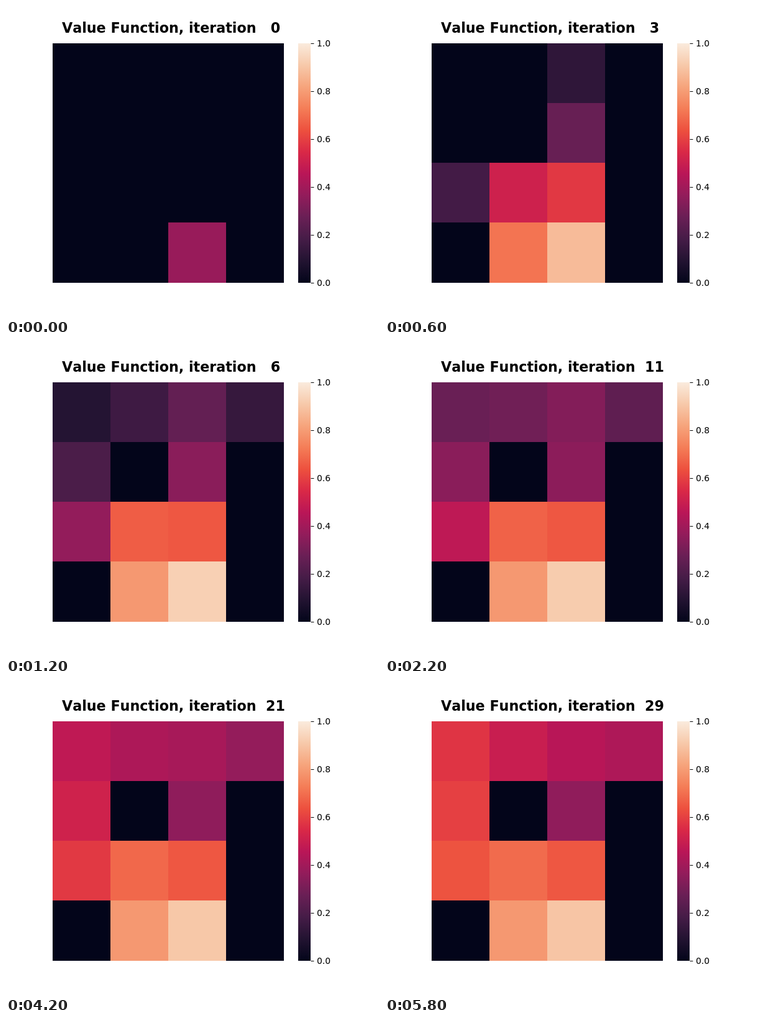
An HTML page with a canvas that plays this animation: 600 px wide and 500 px high, repeating every 6 s.

```html
<!DOCTYPE html>
<html lang="en">
<head>
<meta charset="utf-8">
<title>Value Function</title>
<style>
  html, body { margin: 0; width: 100%; height: 100%; overflow: hidden; background: #fff; }
  canvas { display: block; }
</style>
</head>
<body>
<canvas id="stage" width="600" height="500"></canvas>
<script>
const ctx = document.getElementById('stage').getContext('2d');
const FONT = '"DejaVu Sans", Verdana, sans-serif';
const STEP = 200, STEPS = 30;
const TOP = 60, HEIGHT = 385, LEFT = 75, CELL = 93;
const KNEE = 6; // iteration where the fast rise turns into a slow drift

// Evenly spaced colour stops for values 0 to 1
const RAMP = ('03051a 221331 451c47 691f55 921c5b b91657 ' +
              'd92847 ed503e f47d57 f6a47c f7c9aa faebdd').split(' ')
  .map(hex => [0, 2, 4].map(i => parseInt(hex.slice(i, i + 2), 16)));

// Values spread from the goal one wave per iteration.
// share: part of the final value reached at the knee; ends: cell index to final value
const WAVES = [
  { share: 1.03, ends: { 14: .9 } },
  { share: 1, ends: { 10: .65, 13: .79 } },
  { share: .96, ends: { 6: .36, 9: .69 } },
  { share: .57, ends: { 2: .453, 8: .642 } },
  { share: .33, ends: { 1: .497, 3: .43, 4: .6 } },
  { share: .17, ends: { 0: .572 } }
];

const mix = (a, b, k) => a + (b - a) * k;

function color(v) {
  const x = v * (RAMP.length - 1), i = Math.min(Math.floor(x), RAMP.length - 2);
  return `rgb(${RAMP[i].map((c, j) => Math.round(mix(c, RAMP[i + 1][j], x - i)))})`;
}

// Part of its final value that a wave has reached at iteration n
function progress(n, wave) {
  const { share } = WAVES[wave];
  if (n < wave) return 0;
  if (n < KNEE) {
    const x = (n - wave + 1) / (KNEE - wave + 1);
    return share * (1 - (1 - x) ** (3.4 - wave * wave / 8));
  }
  return mix(share, 1, Math.log((n + 1) / (KNEE + 1)) / Math.log(STEPS / (KNEE + 1)));
}

function text(str, x, y, font) {
  ctx.font = `${font} ${FONT}`;
  ctx.fontKerning = 'none';
  ctx.fillStyle = '#000';
  ctx.fillText(str, x, y);
}

function drawGrid(n) {
  const rowY = r => TOP + Math.floor(HEIGHT * r / 4);
  ctx.fillStyle = color(0);
  ctx.fillRect(LEFT, TOP, CELL * 4, HEIGHT);
  WAVES.forEach(({ ends }, wave) => {
    for (const cell in ends) {
      const col = cell % 4, row = cell >> 2;
      ctx.fillStyle = color(ends[cell] * progress(n, wave));
      ctx.fillRect(LEFT + col * CELL, rowY(row), CELL, rowY(row + 1) - rowY(row));
    }
  });
}

function drawScale() {
  const fill = ctx.createLinearGradient(0, TOP + HEIGHT, 0, TOP);
  RAMP.forEach((c, i) => fill.addColorStop(i / (RAMP.length - 1), `rgb(${c})`));
  ctx.fillStyle = fill;
  ctx.fillRect(470, TOP, 20, HEIGHT);
  for (let i = 0; i <= 5; i++) {
    const y = TOP + HEIGHT * (1 - i / 5);
    text((i / 5).toFixed(1), 500, y + 5, '13.89px');
    ctx.fillRect(490.5, y, 4.9, 1);
  }
}

function frame() {
  const n = Math.floor(performance.now() / STEP) % STEPS;
  ctx.fillStyle = '#fff';
  ctx.fillRect(0, 0, 600, 500);
  text('Value Function, iteration ' + String(n).padStart(3), 90, 43, 'bold 22.22px');
  drawGrid(n);
  drawScale();
  requestAnimationFrame(frame);
}
frame();
</script>
</body>
</html>
```
